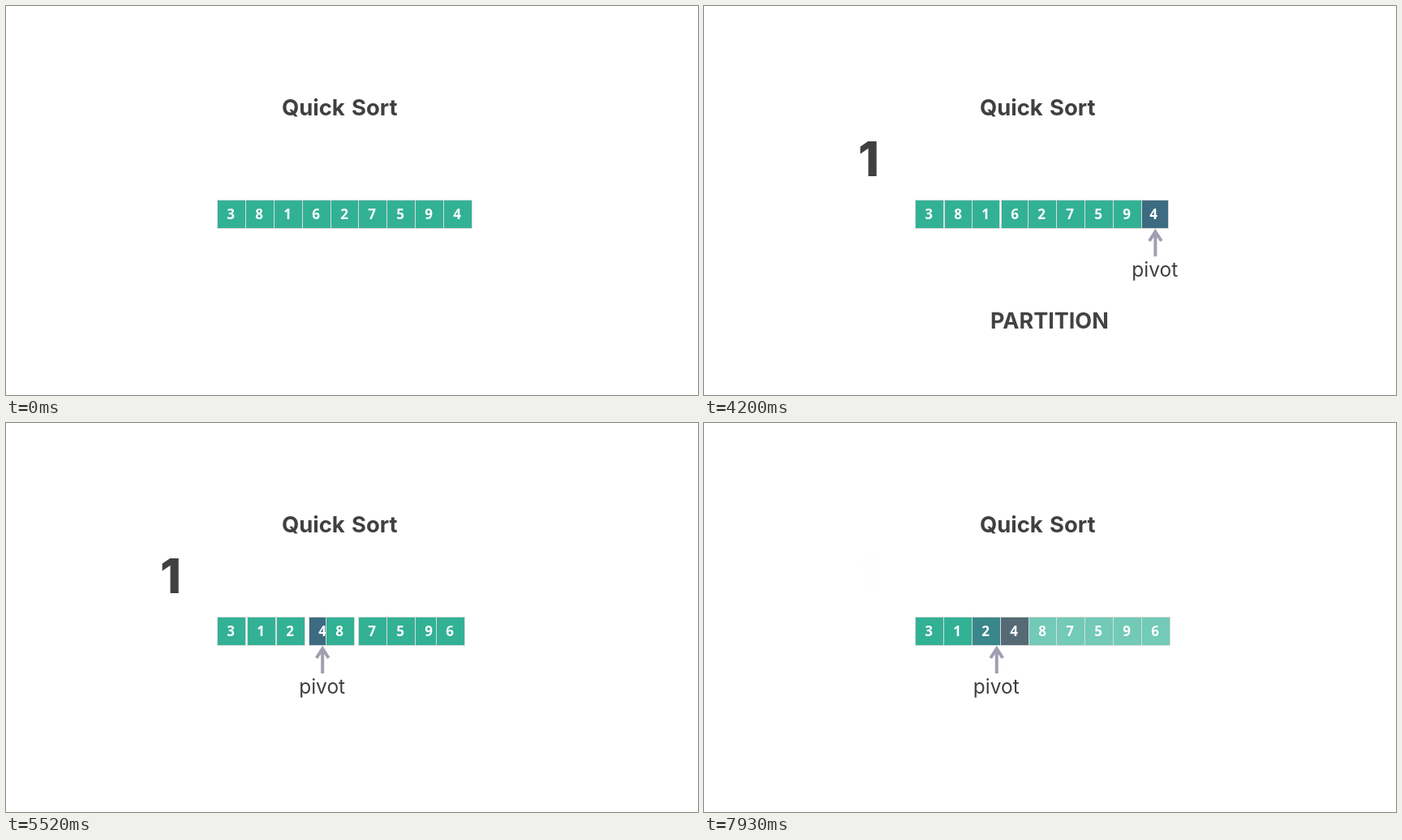
Write an HTML page with a canvas that moves like this. It is 853 by 480 pixels and loops after 7.99 s.

```html
<!DOCTYPE html>
<html lang="en">
<head>
<meta charset="utf-8">
<title>Quick Sort</title>
<style>
  html, body { margin: 0; width: 100%; height: 100%; overflow: hidden; background: #fff; }
  canvas { display: block; width: 853px; height: 480px; }
</style>
</head>
<body>
<canvas id="stage" width="853" height="480"></canvas>
<script>
const ctx = document.getElementById('stage').getContext('2d');

const LOOP = 7990;
const MORPH = 1880;
const STARTS = [1050, 4130, 7220];   // pivot appears, partition, next pivot

const LEFT = 260.2, PITCH = 34.84, TOP = 239, BOTTOM = 274;
const GREEN = [50, 177, 149], BLUE = [61, 107, 130];
const GREY = [102, 106, 106], PALE = [158, 219, 206];
const INK = '#404040', ARROW = '#a09fb2', LINE = '#d9dcda';

const BEFORE = [3, 8, 1, 6, 2, 7, 5, 9, 4];
const AFTER = [3, 1, 2, 4, 8, 7, 5, 9, 6];
const STACK = [4, 8, 9, 5, 7, 6, 2, 1, 3];   // back to front

const lerp = (a, b, p) => a + (b - a) * p;
const clamp = v => Math.min(1, Math.max(0, v));
const mix = (a, b, p) => a.map((v, i) => lerp(v, b[i], p));
const rgb = c => `rgb(${c.map(Math.round).join(',')})`;

// Speed rises linearly until t = a, then falls off as a power.
function ease(t) {
  const a = 0.18, n = 2.42;
  const peak = 1 / (a / 2 + (1 - a) / n);
  if (t < a) return peak * t * t / (2 * a);
  return 1 - peak * (1 - a) / n * ((1 - t) / (1 - a)) ** n;
}

const fadeIn = p => clamp((p - 0.67) / 0.33);
const fadeOut = p => clamp(1 - p / 0.6);

// Places text so that its ink begins at x.
function label(text, x, y, font, alpha = 1) {
  if (!alpha) return;
  ctx.globalAlpha = alpha;
  ctx.font = font;
  ctx.textAlign = 'left';
  ctx.fillStyle = INK;
  ctx.fillText(text, x + ctx.measureText(text).actualBoundingBoxLeft, y);
  ctx.globalAlpha = 1;
}

function drawCell(digit, x, color) {
  const l = Math.round(x), r = Math.round(x + PITCH);
  ctx.fillStyle = rgb(color);
  ctx.fillRect(l, TOP, r - l, BOTTOM - TOP);
  ctx.strokeStyle = LINE;
  ctx.lineWidth = 1;
  ctx.strokeRect(l + 0.5, TOP + 0.5, r - l, BOTTOM - TOP);
  ctx.font = '700 17px "Open Sans", "Noto Sans", sans-serif';
  ctx.textAlign = 'center';
  ctx.fillStyle = '#fff';
  ctx.fillText(digit, l + 17, 263);
}

function drawPivot(x, alpha) {
  if (!alpha) return;
  ctx.globalAlpha = alpha;
  ctx.strokeStyle = ARROW;
  ctx.lineWidth = 4;
  ctx.beginPath();
  ctx.moveTo(x, 309);
  ctx.lineTo(x, 279);
  ctx.moveTo(x - 7.5, 290);
  ctx.lineTo(x, 278.5);
  ctx.lineTo(x + 7.5, 290);
  ctx.stroke();
  label('pivot', x - 28, 334, '400 24.5px Inter, sans-serif', alpha);
}

function cellColor(digit, appear, next) {
  if (digit === 4) return mix(mix(GREEN, BLUE, appear), GREY, next);
  if (digit === 2) return mix(GREEN, BLUE, next);
  if (digit > 4) return mix(GREEN, PALE, next);
  return GREEN;
}

function draw(time) {
  const [appear, move, next] = STARTS.map(s => ease(clamp((time - s) / MORPH)));

  ctx.fillStyle = '#fff';
  ctx.fillRect(0, 0, 853, 480);

  const title = '700 27.4px Inter, sans-serif';
  label('Quick', 341, 135, title);
  label('Sort', 427, 135, title);
  label('1', 192, 210, '800 59px Inter, sans-serif', fadeIn(appear) * fadeOut(next));
  label('PARTITION', 354, 398, '700 27px Inter, sans-serif', fadeIn(appear) * fadeOut(move));

  for (const d of STACK) {
    const slot = lerp(BEFORE.indexOf(d), AFTER.indexOf(d), move);
    drawCell(d, LEFT + PITCH * slot, cellColor(d, appear, next));
  }

  drawPivot(lerp(558, 381.5, move) - PITCH * next, fadeIn(appear));
}

function tick() {
  draw(performance.now() % LOOP);
  requestAnimationFrame(tick);
}
tick();
</script>
</body>
</html>
```
